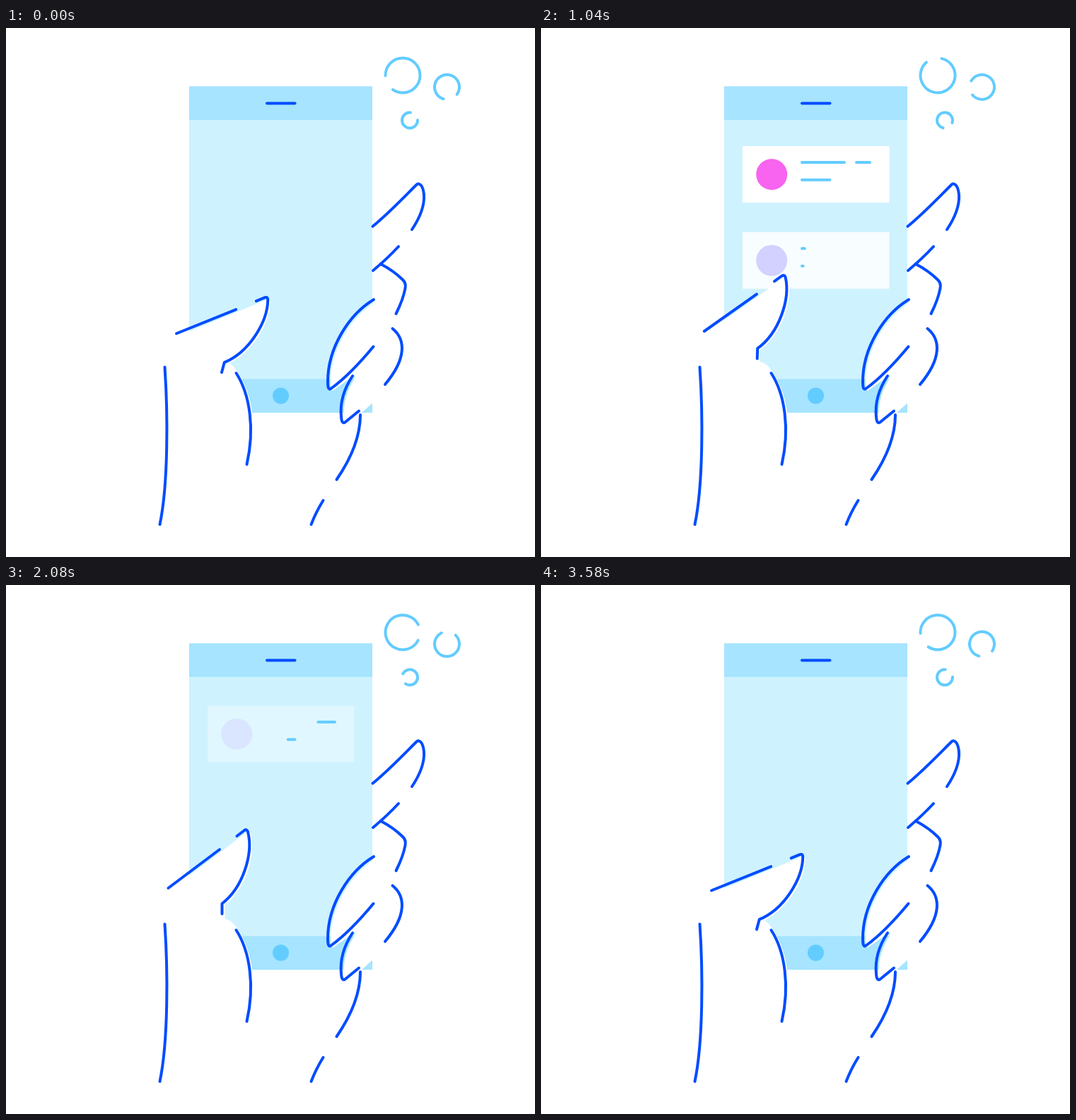
Animation, 748 px wide and 748 px high, one loop 3600 ms. Source, as an HTML page with a canvas:

```html
<!DOCTYPE html>
<html lang="en">
<head>
<meta charset="utf-8">
<title>Phone in hand</title>
<style>
  html, body { margin: 0; width: 100%; height: 100%; overflow: hidden; background: #fff; }
  canvas { display: block; width: 748px; height: 748px; }
</style>
</head>
<body>
<canvas id="stage" width="748" height="748"></canvas>
<script>
const ctx = document.getElementById('stage').getContext('2d');
const LOOP = 3600;
const INK = '#004cff', SKY = '#63ccff', BAR = '#a6e4ff', SCREEN = '#cef2fe';
const LAVENDER = [204, 202, 255];

// Bubbles: centre, radius, middle of the gap and half its width in degrees
const bubbles = [
  { x: 561, y: 67, r: 24.5, gap: 152, half: 27 },
  { x: 623.5, y: 83.5, r: 17.5, gap: 71, half: 35 },
  { x: 571, y: 130.5, r: 11, gap: -43, half: 42 }
];

// Each pair is [start, end] in ms
const cards = [
  {
    y: 167, color: [248, 99, 240], dashes: [[0, 60], [77, 96]],
    enter: [240, 494], tint: [220, 460], draw: [405, 700],
    untint: [1080, 1360], leave: [1280, 1630], erase: [1360, 1660], fade: [1440, 1650]
  },
  {
    y: 285, color: [255, 221, 0], dashes: [[0, 96]],
    enter: [860, 1100], tint: [1050, 1290], draw: [1000, 1320],
    untint: [1600, 1880], leave: [1800, 2150], erase: [1880, 2180], fade: [1960, 2170]
  }
];
const RISE = 26, EXIT_Y = 159;

const palm = new Path2D('M222 470H305C316 471 322 482 325.5 488C345 518 352 567 340.5 617H222Z');
const fingers = new Path2D(`M520 384C485 405 455 452 455 500C455 508 456 513 460 509.5
  Q475 499 490 488V492C478 510 472 530 474 550C474.5 557 476.5 560 480 557
  L499 542L530 514V384Z`);
const handLines = new Path2D(`
  M224.5 479.5C229 545 229.5 645 217.5 702
  M325.5 488C345 518 352 567 340.5 617
  M518.5 280.5C540 263 562 240 580 222C585 217 590 224 591 236C592 252 584 270 574 285
  M519 343C532 332 544 321 555 309
  M529.5 333.5C540 339 551 346 561 356Q566 361 564.5 368C562 382 557 393 551.5 404
  M546.5 425C565 440 567 467 536 504
  M520 384C485 405 455 452 455 500C455 508 456 513 460 509.5C480 495 500 474 519.5 450.5
  M490 492C478 510 472 530 474 550C474.5 557 476.5 560 480 557L499 541.5
  M501 547C501 580 485 613 467.5 638.5
  M448.5 668Q438.5 684 431.5 702`);

const thumbEdge = 'L337 347Q340.5 344.5 342 349C350 380 335 428 305.5 450.5';
const thumbFill = new Path2D(`M229.5 428.5${thumbEdge}V472L222 474Z`);
const thumbLines = new Path2D(`M229.5 428.5L302 374M326.5 355${thumbEdge}V465`);
const PIVOT = { x: 222, y: 474 };

function ease(t, [from, to]) {
  const u = Math.min(1, Math.max(0, (t - from) / (to - from)));
  return (1 - Math.cos(Math.PI * u)) / 2;
}

function mix(a, b, u) {
  return `rgb(${a.map((v, i) => Math.round(v + (b[i] - v) * u)).join(',')})`;
}

function rect(x, y, w, h, color) {
  ctx.fillStyle = color;
  ctx.fillRect(x, y, w, h);
}

function disc(x, y, r, color) {
  ctx.fillStyle = color;
  ctx.beginPath();
  ctx.arc(x, y, r, 0, Math.PI * 2);
  ctx.fill();
}

function line(x1, x2, y, color) {
  ctx.strokeStyle = color;
  ctx.beginPath();
  ctx.moveTo(x1, y);
  ctx.lineTo(x2, y);
  ctx.stroke();
}

// The white fills sit slightly to the lower right of their outlines
function fillOffset(path) {
  ctx.save();
  ctx.translate(4, 2);
  ctx.fillStyle = '#fff';
  ctx.fill(path);
  ctx.restore();
}

function drawBubbles(t) {
  const rad = Math.PI / 180, spin = 360 * t / LOOP;
  ctx.strokeStyle = SKY;
  for (const b of bubbles) {
    const mid = b.gap + spin;
    ctx.beginPath();
    ctx.arc(b.x, b.y, b.r, (mid + b.half) * rad, (mid + 360 - b.half) * rad);
    ctx.stroke();
  }
}

function drawPhone() {
  rect(259, 82.5, 259, 461.5, SCREEN);
  rect(259, 82.5, 259, 47.5, BAR);
  rect(259, 496.5, 259, 47.5, BAR);
  line(369, 408.5, 106.5, INK);
  disc(388.5, 520, 11.5, SKY);
}

function drawTextLine(y, length, dashes, from, to) {
  for (const [start, end] of dashes) {
    const a = Math.max(start, from * length), b = Math.min(end, to * length);
    if (b > a) line(369 + a, 369 + b, y, SKY);
  }
}

function drawCard(card, t) {
  const shown = ease(t, card.enter);
  const y = card.y + RISE * (1 - shown) + (EXIT_Y - card.y) * ease(t, card.leave);
  const tint = ease(t, card.tint) - ease(t, card.untint);
  ctx.globalAlpha = shown * (1 - ease(t, card.fade));
  rect(285, y, 207.5, 80, '#fff');
  disc(326.2, y + 40, 22, mix(LAVENDER, card.color, tint));
  ctx.globalAlpha = 1;

  const from = ease(t, card.erase), to = ease(t, card.draw);
  drawTextLine(y + 23, 96, card.dashes, from, to);
  drawTextLine(y + 47.7, 39.5, [[0, 39.5]], from, to);
}

function thumbAngle(t) {
  const down = 1 - ease(t, [40, 400]) + ease(t, [400, 760])
    - ease(t, [760, 1120]) + ease(t, [3200, 3560]);
  return 15 * down * Math.PI / 180;
}

function drawHand(t) {
  fillOffset(palm);
  fillOffset(fingers);
  ctx.strokeStyle = INK;
  ctx.stroke(handLines);

  ctx.save();
  ctx.translate(PIVOT.x, PIVOT.y);
  ctx.rotate(thumbAngle(t));
  ctx.translate(-PIVOT.x, -PIVOT.y);
  fillOffset(thumbFill);
  ctx.stroke(thumbLines);
  ctx.restore();
}

function render(t) {
  rect(0, 0, 748, 748, '#fff');
  ctx.lineWidth = 4;
  ctx.lineCap = ctx.lineJoin = 'round';
  drawBubbles(t);
  drawPhone();
  for (const card of cards) drawCard(card, t);
  drawHand(t);
}

const start = performance.now();
function tick() {
  render((performance.now() - start) % LOOP);
  requestAnimationFrame(tick);
}
tick();
</script>
</body>
</html>
```
